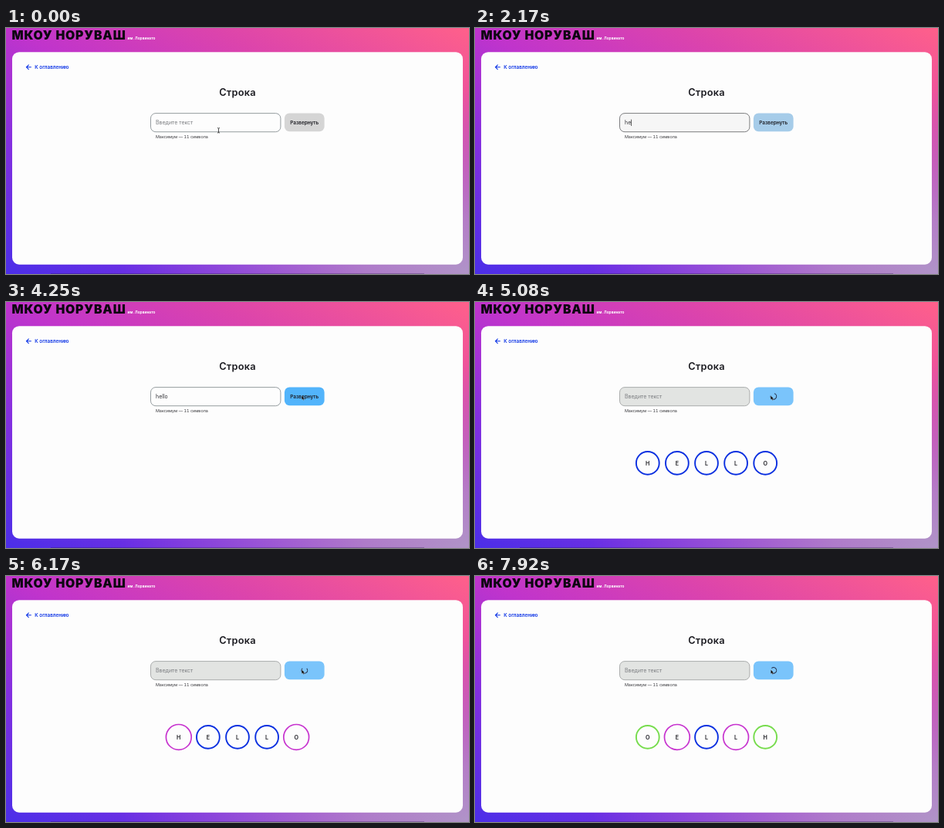
An HTML page that plays this animation: 600x319 px, repeating every 8 s.

```html
<!DOCTYPE html>
<html lang="ru">
<head>
<meta charset="utf-8">
<title>Строка</title>
<style>
  html, body { margin: 0; width: 100%; height: 100%; overflow: hidden; }
  svg { display: block; width: 100vw; height: 100vh; font-family: Inter, "Open Sans", sans-serif; fill: #1c1c22; }
  .semi { font-weight: 600; }
  .middle { text-anchor: middle; }
  .hint { font-variant-numeric: tabular-nums; }
</style>
</head>
<body>
<svg viewBox="0 0 600 319" preserveAspectRatio="none">
  <defs>
    <linearGradient id="sky" x1="0" y1="1" x2="1" y2="0">
      <stop offset="0" stop-color="#4b2ee8"/>
      <stop offset=".27" stop-color="#8430e0"/>
      <stop offset=".5" stop-color="#c034cc"/>
      <stop offset=".72" stop-color="#dc44ac"/>
      <stop offset="1" stop-color="#ff608a"/>
    </linearGradient>
    <radialGradient id="haze" cx="1" cy="1" r=".75">
      <stop offset="0" stop-color="#b094c8"/>
      <stop offset=".3" stop-color="#b088c8" stop-opacity=".85"/>
      <stop offset="1" stop-color="#a868d0" stop-opacity="0"/>
    </radialGradient>
  </defs>

  <rect width="600" height="319" fill="url(#sky)"/>
  <rect width="600" height="319" fill="url(#haze)"/>
  <rect x="58" y="318" width="484" height="1" fill="#201040" opacity=".3"/>

  <text x="7.5" y="15" font-size="15.8" font-weight="900" letter-spacing=".8" fill="#0c0710">МКОУ НОРУВАШ</text>
  <text x="157.6" y="14.6" font-size="4.8" font-weight="700" fill="#fff">им. Лорвинато</text>

  <rect x="8" y="31.2" width="584" height="275.5" rx="9" fill="#fdfdfd"/>
  <path d="M32.8 50.8H26.6M29.6 47.7L26.5 50.8L29.6 53.9" fill="none" stroke="#0a32e6" stroke-width="1.1"/>
  <text x="37.3" y="53.2" font-size="6.3" class="semi" fill="#0a32e6">К оглавлению</text>
  <text x="300" y="88.2" font-size="12.8" letter-spacing=".2" class="semi middle">Строка</text>

  <rect id="field" x="187.5" y="110.6" width="168.4" height="24.1" rx="6.5" stroke-width=".8"/>
  <text id="value" x="194" y="125.4" font-size="7"></text>
  <path id="caret" stroke="#222" stroke-width=".7"/>
  <text x="194" y="143.2" font-size="5.4" class="hint" fill="#38383c">Максимум — 11 символа</text>

  <rect id="button" x="360.9" y="110.4" width="51.7" height="23.8" rx="6.5"/>
  <text id="label" x="386.8" y="124.6" font-size="6.4" class="semi middle">Развернуть</text>
  <circle id="loader" cx="386.9" cy="122.4" r="3.8" fill="none" stroke="#26304a" stroke-width="1" pathLength="360" stroke-dasharray="265 95"/>

  <g id="row" class="semi middle" font-size="7.2"></g>

  <path id="beam" d="M-1.5 -3.2Q0 -3.2 0 -2.4Q0 -3.2 1.5 -3.2M0 -2.4V2.4M-1.5 3.2Q0 3.2 0 2.4Q0 3.2 1.5 3.2" fill="none" stroke="#222" stroke-width=".8"/>
  <path id="hand" d="M-1.4 .6V-2.8Q-.7 -3.8 0 -2.8V-.8L2.2 -.3Q3 0 2.8 1L2.2 3.4H-.9L-2.8 .9Q-2.6 -.1 -1.4 .6Z" fill="#fff" stroke="#222" stroke-width=".7"/>
  <path id="arrow" d="M0 0V5.2L1.2 4.1L2.1 6L3 5.6L2.1 3.8H3.8Z" fill="#000" stroke="#fff" stroke-width=".25"/>
</svg>

<script>
const LOOP = 8000;
const FOCUS = 1000, BLUR = 3660, HOVER = 3800, PRESS = 4990, STEP = 1000;
const KEYS = [[2000, 'h'], [2160, 'e'], [2840, 'l'], [3000, 'l'], [3170, 'o']];
const BLUE = '#0a2fe0', PINK = '#c733cf', GREEN = '#76dc4c';
const GRAY = [213, 213, 213], LIGHT = [122, 196, 251], BRIGHT = [82, 180, 251];

const el = id => document.getElementById(id);
const set = (node, attrs) => { for (const k in attrs) node.setAttribute(k, attrs[k]); };
const show = (node, on) => set(node, { visibility: on ? 'visible' : 'hidden' });
const progress = (t, from, to) => Math.min(1, Math.max(0, (t - from) / (to - from)));
const ease = p => p * p * (3 - 2 * p);
const lerp = (a, b, p) => a + (b - a) * p;
const mix = (a, b, p) => a.map((v, i) => Math.round(lerp(v, b[i], p)));
const place = (node, x, y) => set(node, { transform: `translate(${x} ${y})` });

function make(tag, parent, attrs) {
  const node = document.createElementNS('http://www.w3.org/2000/svg', tag);
  set(node, attrs);
  return parent.appendChild(node);
}

const cells = [...'HELLO'].map((_, i) => {
  const cx = 223.8 + i * 38.1;
  return {
    ring: make('circle', el('row'), { cx, cy: 208.9, fill: '#fdfdfd' }),
    text: make('text', el('row'), { x: cx, y: 211.5 })
  };
});

function drawField(t) {
  const typed = KEYS.filter(([at]) => at <= t);
  const busy = t >= PRESS;
  const focused = t >= FOCUS && t < BLUR;
  const text = busy ? '' : typed.map(k => k[1]).join('');
  const value = el('value');
  value.textContent = text || 'Введите текст';
  set(value, { fill: text ? '#333338' : '#7b7d80' });
  set(el('field'), {
    fill: busy ? '#e2e4e2' : focused ? '#f6f6f6' : '#fdfdfd',
    stroke: busy ? '#9a9c9c' : focused ? '#5c5e60' : '#7c8488'
  });

  const lastKey = typed.length ? typed[typed.length - 1][0] : FOCUS;
  show(el('caret'), focused && (t - lastKey) % 1000 < 500);
  const x = 194.3 + (text ? value.getComputedTextLength() : 0);
  set(el('caret'), { d: `M${x} 118.6V127` });
}

function drawButton(t) {
  const busy = t >= PRESS;
  const enabled = mix(GRAY, LIGHT, progress(t, 2000, 2330));
  const color = busy ? LIGHT : mix(enabled, BRIGHT, progress(t, HOVER, HOVER + 300));
  set(el('button'), { fill: `rgb(${color})` });
  show(el('label'), !busy);
  show(el('loader'), busy);
  // The dash gap is centred 48 degrees before the start of the stroke.
  const angle = 228 + 360 * (t / 1000 - 0.92);
  set(el('loader'), { transform: `rotate(${angle % 360} 386.9 122.4)` });
}

function drawPointer(t) {
  const toField = ease(progress(t, 250, 900));
  const toButton = ease(progress(t, 3270, 3950));
  const x = lerp(lerp(275.5, 274.3, toField), 383.3, toButton);
  const y = lerp(lerp(132.8, 128, toField), 121.6, toButton);
  const overButton = x > 361;
  show(el('beam'), t < FOCUS || (t >= 3270 && !overButton));
  show(el('hand'), t >= FOCUS && t < KEYS[0][0]);
  show(el('arrow'), overButton);
  ['beam', 'hand', 'arrow'].forEach(id => place(el(id), x, y));
}

function drawRow(t) {
  show(el('row'), t >= PRESS);
  // Each step swaps the highlighted pair and highlights the next one inward.
  const stage = Math.floor((t - PRESS) / STEP);
  const letters = [...'HELLO'];
  for (let i = 0; i < stage - 1; i++) {
    [letters[i], letters[4 - i]] = [letters[4 - i], letters[i]];
  }
  cells.forEach(({ ring, text }, i) => {
    const depth = Math.min(i, 4 - i) + 1;
    const active = depth === stage;
    set(ring, {
      r: active ? 16.4 : 14.9,
      'stroke-width': active ? 1.7 : 1.9,
      stroke: active ? PINK : depth < stage ? GREEN : BLUE
    });
    text.textContent = letters[i];
  });
}

function draw(t) {
  drawField(t);
  drawButton(t);
  drawPointer(t);
  drawRow(t);
}

const start = performance.now();
function tick(now) {
  draw(Math.max(0, now - start) % LOOP);
  requestAnimationFrame(tick);
}
draw(0);
requestAnimationFrame(tick);
</script>
</body>
</html>
```
